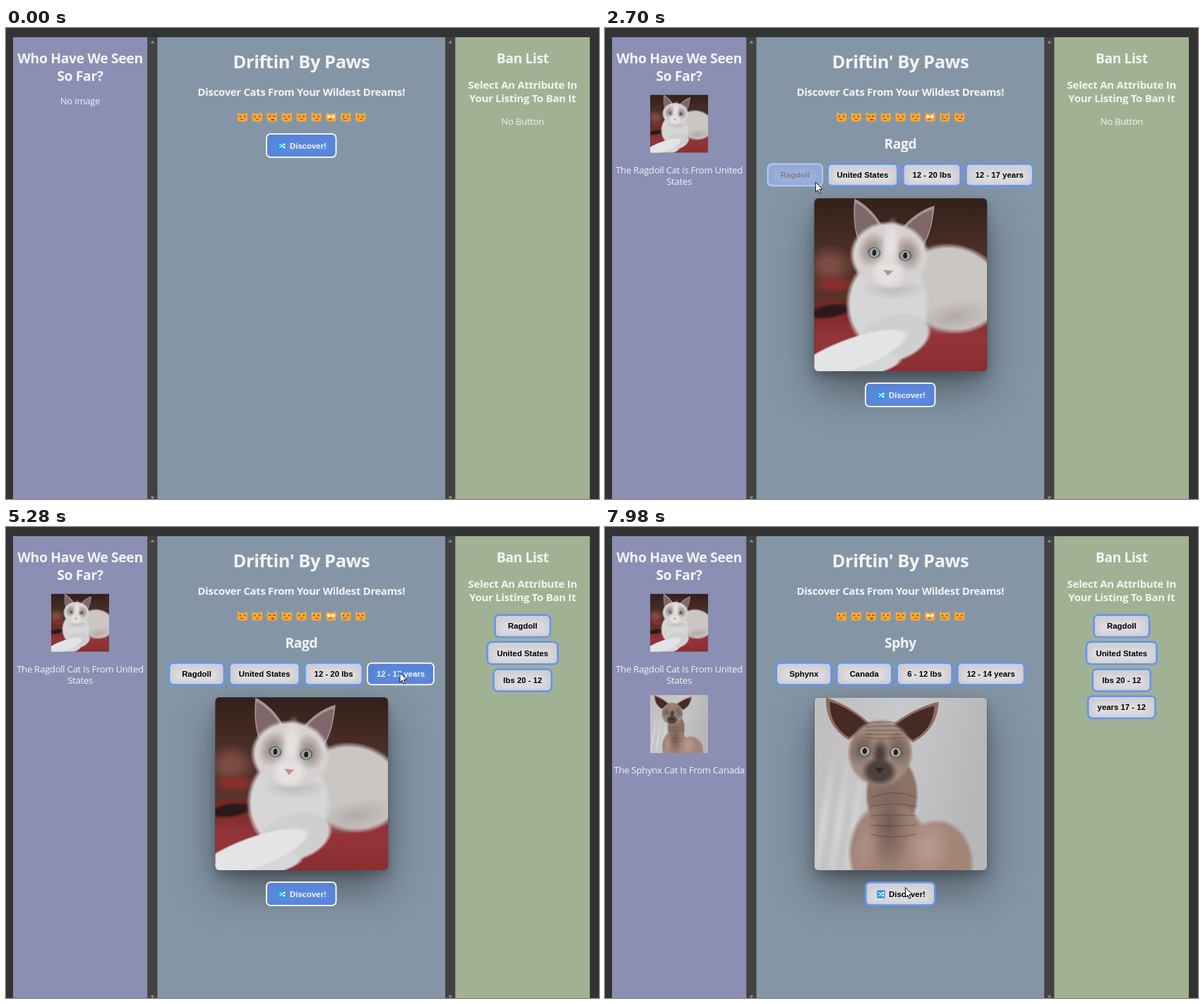
Recreate the animation shown at these times as an HTML page with a canvas. Size 840 by 667 pixels, loop 8 s.

```html
<!DOCTYPE html>
<html lang="en">
<head>
<meta charset="utf-8">
<title>Cat discovery</title>
<style>
html, body { margin: 0; width: 100%; height: 100%; overflow: hidden; background: #333; }
canvas { display: block; width: 840px; height: 667px; }
</style>
</head>
<body>
<canvas id="stage" width="840" height="667"></canvas>
<script>
const ctx = document.getElementById('stage').getContext('2d');
const LOOP = 8000, APPEAR = 260, LOAD1 = 1890, LOAD2 = 7390;
const LEFT = 105, MID = 418.4, RIGHT = 731.8;
const SANS = '"Open Sans", "Noto Sans", sans-serif';
const ARIAL = 'bold 11.4px "Liberation Sans", Arial, sans-serif';

const clamp = v => Math.max(0, Math.min(1, v));
const lerp = (a, b, k) => a + (b - a) * k;
const mix = (a, b, k) => `rgb(${a.map((v, i) => Math.round(lerp(v, b[i], k))).join()})`;

// Pointer moves: start, end, x, y, sideways bow, strength of the slow-down
const moves = [
  [APPEAR, 1020, 440, 172],
  [1100, 1430, 464, 324],
  [2430, 3180, 266, 206, -12, 4.3],
  [3250, 3720, 343, 206],
  [3850, 3920, 355, 204],
  [4110, 4670, 467, 201],
  [4810, 5350, 559, 206],
  [5490, 6250, 425, 515, 49, 2.6],
  [7910, 7980, 425, 510]
];

function pointer(t) {
  let x = 587, y = 621;
  for (const [t0, t1, toX, toY, bow = 0, snap = 2] of moves) {
    if (t < t0) break;
    const dx = toX - x, dy = toY - y;
    const u = 1 - (1 - clamp((t - t0) / (t1 - t0))) ** snap;
    const side = 4 * u * (1 - u) * bow / Math.hypot(dx, dy);
    x += dx * u + dy * side;
    y += dy * u - dx * side;
  }
  return [x, y];
}

// Hover fades by the share of the last moments the pointer spent inside
function hover(t, x, y, w, h) {
  const n = 26;
  let hits = 0;
  for (let i = 0; i < n; i++) {
    const past = t - i * 5, [px, py] = pointer(past);
    if (past >= APPEAR && px > x && px < x + w && py > y && py < y + h) hits++;
  }
  return 1 - (1 - hits / n) ** 2;
}

function text(str, x, y, size, bold) {
  ctx.font = `${bold ? 'bold ' : ''}${size}px ${SANS}`;
  ctx.letterSpacing = (-0.02 * size) + 'px';
  ctx.textAlign = 'center';
  ctx.fillStyle = '#f3f3f3';
  ctx.fillText(str, x, y);
  ctx.letterSpacing = '0px';
}

function rect(x, y, w, h, color) {
  ctx.fillStyle = color;
  ctx.fillRect(x, y, w, h);
}

function box(x, y, w, h, r) {
  ctx.beginPath();
  ctx.roundRect(x, y, w, h, r);
}

function poly(color, ...pts) {
  ctx.fillStyle = color;
  ctx.beginPath();
  for (const [x, y] of pts) ctx.lineTo(x, y);
  ctx.closePath();
  ctx.fill();
}

function shade(x0, y0, x1, y1, ...colors) {
  const g = ctx.createLinearGradient(x0, y0, x1, y1);
  colors.forEach((c, i) => g.addColorStop(i / (colors.length - 1), c));
  return g;
}

// Oval that is solid up to `core` and fades out at its rim
function soft(color, x, y, rx, ry, turn = 0, core = .88) {
  ctx.save();
  ctx.translate(x, y);
  ctx.rotate(turn);
  ctx.scale(rx, ry);
  const g = ctx.createRadialGradient(0, 0, core, 0, 0, 1);
  g.addColorStop(0, color);
  g.addColorStop(1, color + '00');
  ctx.fillStyle = g;
  ctx.beginPath();
  ctx.arc(0, 0, 1, 0, 7);
  ctx.fill();
  ctx.restore();
}

function ear(side, tip, color) {
  ctx.fillStyle = color;
  ctx.beginPath();
  ctx.moveTo(side * 12, -36);
  ctx.quadraticCurveTo(side * tip * .55, -64, side * tip, -74);
  ctx.quadraticCurveTo(side * tip, -35, side * 46, -15);
  ctx.fill();
}

// Head drawn around the point between the eyes
function head(c) {
  ctx.save();
  ctx.translate(c.x, c.y);
  ctx.rotate(c.tilt);
  for (const s of [-1, 1]) {
    ear(s, c.tip, c.ear);
    ctx.save();
    ctx.translate(s * 7, -6);
    ctx.scale(.84, .84);
    ear(s, c.tip, c.inner);
    ctx.restore();
  }
  soft(c.face, 0, 2, c.wide, 49);
  for (const s of [-1, 1]) soft(c.mask, s * 26, -4, 20, 27, s * -.3, .3);
  soft(c.muzzle, 0, 28, 26, 21, 0, .6);
  soft(c.muzzle, 0, 26 - c.blaze, 13, c.blaze, 0, .3);
  for (const s of [-1, 1]) {
    soft('#4f4648', s * 22, 0, 10, 8.5, s * -.2, .7);
    soft(c.iris, s * 22, 0, 7.5, 7);
    soft('#202125', s * 22, 0, 3.2, 4.5);
  }
  poly(c.nose, [-7, 23], [7, 23], [0, 31]);
  ctx.restore();
}

function ragdoll() {
  rect(0, 0, 245, 245, shade(0, 0, 0, 150, '#33201b', '#4b2f27', '#5c332b'));
  soft('#7a4c42', 22, 95, 36, 30, 0, .3);
  soft('#8a2e2b', 28, 122, 32, 13, 0, .4);
  rect(0, 146, 245, 99, shade(0, 146, 0, 245, '#702725', '#94343a', '#8a2e2f'));
  soft('#2b191b', 22, 160, 36, 11, -.15, .6);
  soft('#cac6c4', 195, 128, 76, 64, .25);
  soft('#b5adab', 200, 168, 58, 24, -.2, .1);
  soft('#d6d6d7', 104, 150, 60, 70);
  soft('#d0cfd0', 112, 198, 56, 34, -.3);
  soft('#d6d7d8', 55, 238, 72, 18, -.15);
  soft('#e2e4e5', 52, 221, 88, 23, -.35);
  soft('#bfbcbc', 112, 128, 48, 16, 0, .1);
  head({ x: 107, y: 79, tilt: .09, tip: 57, wide: 57, blaze: 40, ear: '#a3948f', inner: '#80676a',
    face: '#d6d1d0', mask: '#a1938f', muzzle: '#e4e1e0', iris: '#98a6ab', nose: '#bd908e' });
}

function folds(n, x, y, w, step) {
  ctx.strokeStyle = 'rgba(85,62,54,.45)';
  ctx.lineWidth = 1.6;
  for (let i = 0; i < n; i++) {
    ctx.beginPath();
    ctx.moveTo(x - w, y + i * step);
    ctx.quadraticCurveTo(x, y + (i * 1.4 - 1) * step, x + w, y + i * step);
    ctx.stroke();
  }
}

function sphynx() {
  rect(0, 0, 245, 245, shade(0, 0, 245, 60, '#bdbdc0', '#c9c9cb', '#b7b7ba'));
  for (let i = 0; i < 3; i++) soft('#d3d3d5', 12 + i * 22, 185, 9, 110, .15, .1);
  soft('#8a7267', 110, 138, 38, 58);
  soft('#a08376', 106, 220, 59, 74);
  soft('#a48679', 174, 236, 53, 64);
  soft('#775f57', 106, 180, 30, 72, 0, .1);
  soft('#b9998d', 162, 214, 32, 44, .2, .1);
  soft('#ad8f83', 72, 215, 20, 45, .15, .1);
  folds(5, 112, 142, 32, 13);
  head({ x: 93.5, y: 77, tilt: .04, tip: 80, wide: 47, blaze: 23, ear: '#8c6d60', inner: '#472a26',
    face: '#a08a7d', mask: '#79675e', muzzle: '#4c413e', iris: '#a3a89f', nose: '#2c2727' });
  folds(5, 99, 37, 26, 5);
}

function photo(draw, x, y, size, r) {
  ctx.save();
  box(x, y, size, size, r);
  ctx.clip();
  ctx.translate(x, y);
  ctx.scale(size / 245, size / 245);
  draw();
  ctx.restore();
}

function shadow(x, y, s, dy, blur, alpha) {
  ctx.save();
  ctx.shadowColor = `rgba(0,0,0,${alpha})`;
  ctx.shadowBlur = blur;
  ctx.shadowOffsetY = dy;
  box(x, y, s, s, 6);
  ctx.fillStyle = '#444';
  ctx.fill();
  ctx.restore();
}

// k runs from the light look (0) to the blue look (1)
function button(x, y, w, h, k) {
  const b = lerp(2.5, 1.8, k);
  box(x + b / 2, y + b / 2, w - b, h - b, 6);
  ctx.fillStyle = mix([224, 223, 226], [93, 139, 224], k);
  ctx.fill();
  ctx.lineWidth = b;
  ctx.strokeStyle = mix([100, 149, 237], [245, 245, 245], k);
  ctx.save();
  ctx.clip();
  ctx.shadowColor = 'rgba(40,30,70,.5)';
  ctx.shadowBlur = 13;
  ctx.shadowOffsetY = 2;
  ctx.stroke();
  ctx.restore();
  ctx.stroke();
  ctx.font = ARIAL;
  ctx.fillStyle = mix([0, 0, 0], [245, 245, 245], k);
}

function label(str, x, y) {
  ctx.textAlign = 'center';
  ctx.fillText(str, x, y);
}

function tagWidth(str) {
  ctx.font = ARIAL;
  return Math.max(80.5, ctx.measureText(str).width + 29);
}

function tagRow(t, tags) {
  const gap = 5, full = tags.map(tagWidth);
  const sum = list => list.reduce((a, b) => a + b + gap, -gap);
  let x = MID - sum(full) / 2;
  const lit = full.map(w => {
    const k = hover(t, x, 191, w, 34);
    x += w + gap;
    return k;
  });
  const widths = full.map((w, i) => w - 1.5 * lit[i]);
  x = MID - sum(widths) / 2;
  tags.forEach((s, i) => {
    const k = lit[i], w = widths[i];
    button(x, 191 + .8 * k, w, 34 - 1.6 * k, k);
    label(s, x + w / 2, 212);
    x += w + gap;
  });
}

function discover(t, y) {
  button(368, y, 100.5, 35, 1 - hover(t, 368, y, 100.5, 35));
  ctx.textAlign = 'left';
  ctx.fillText('Discover!', 402, y + 22);
  box(385.3, y + 12.3, 11.5, 11.5, 1.5);
  ctx.fillStyle = '#2699e6';
  ctx.fill();
  ctx.strokeStyle = '#fff';
  ctx.lineWidth = 1.1;
  ctx.beginPath();
  for (const s of [-2, 2]) {
    const m = y + 18;
    ctx.moveTo(387, m + s);
    ctx.lineTo(389, m + s);
    ctx.lineTo(392.5, m - s);
    ctx.lineTo(395, m - s);
    ctx.moveTo(393.6, m - s - 1.5);
    ctx.lineTo(395.2, m - s);
    ctx.lineTo(393.6, m - s + 1.5);
  }
  ctx.stroke();
}

function catFace(i) {
  const ink = '#70451f', wide = i === 2, starry = i === 6;
  ctx.save();
  ctx.translate(335 + 20.9 * i, 126);
  box(-7, -4.4, 14, 11, 3);
  ctx.fillStyle = '#f9a632';
  ctx.fill();
  for (const s of [-1, 1]) {
    poly('#f9a632', [7 * s, -6.5], [7 * s, 0], [1.5 * s, -4]);
    if (starry) soft('#fff3dc', 3 * s, -.6, 2.6, 2.4);
    else rect(3.2 * s - (wide ? 2 : 1), -1.6, wide ? 4 : 2, wide ? 1.2 : 1.8, ink);
  }
  rect(i % 3 - 3, 2.8, 4, wide ? 2 : 1, ink);
  if (i === 7) soft('#49a9e4', -3.4, 3, 1.4, 2);
  ctx.restore();
}

function scrollbar(x) {
  rect(x, 13, 14, 654, '#424242');
  const c = x + 7;
  for (const y of [18, 663.5]) {
    const up = y < 99 ? 0 : 3.5;
    poly('#949494', [c - 3, y + 3.5 - up], [c, y + up], [c + 3, y + 3.5 - up]);
  }
}

function arrow(x, y) {
  ctx.save();
  ctx.translate(x + .5, y + .5);
  ctx.lineJoin = 'round';
  poly('#fff', [0, 0], [0, 13.6], [3.2, 10.8], [5.4, 16], [7.6, 15], [5.4, 10], [9.6, 9.8]);
  ctx.strokeStyle = '#111';
  ctx.lineWidth = 1;
  ctx.stroke();
  ctx.restore();
}

function history(loaded, second) {
  text('Who Have We Seen', LEFT, 50, 19.4, true);
  text('So Far?', LEFT, 74.5, 19.4, true);
  if (!loaded) return text('No Image', LEFT, 108, 13.1);
  photo(ragdoll, 64, 94.5, 82, 0);
  text('The Ragdoll Cat Is From United', LEFT, 205.5, 13.1);
  text('States', LEFT, 222, 13.1);
  if (!second) return;
  photo(sphynx, 64, 238, 82, 0);
  text('The Sphynx Cat Is From Canada', LEFT, 349, 13.1);
}

function finder(t, loaded, second) {
  text("Driftin' By Paws", MID, 57, 25.6, true);
  text('Discover Cats From Your Wildest Dreams!', MID, 96.3, 14.9, true);
  for (let i = 0; i < 9; i++) catFace(i);
  if (loaded) {
    const frame = [296.5, 241.3, 244.7];
    shadow(...frame, 26, 60, .4);
    shadow(...frame, 8, 14, .2);
    photo(second ? sphynx : ragdoll, ...frame, 6);
    text(second ? 'Sphy' : 'Ragd', MID, 170.5, 19.2, true);
    tagRow(t, second ? ['Sphynx', 'Canada', '6 - 12 lbs', '12 - 14 years']
      : ['Ragdoll', 'United States', '12 - 20 lbs', '12 - 17 years']);
  }
  discover(t, loaded ? 502 : 149);
}

function banList(t) {
  text('Ban List', RIGHT, 50, 19.2, true);
  text('Select An Attribute In', RIGHT, 85.7, 15, true);
  text('Your Listing To Ban It', RIGHT, 104.5, 15, true);
  const bans = [['Ragdoll', 3110], ['United States', 3920], ['lbs 20 - 12', 4670], ['years 17 - 12', 5350]]
    .filter(b => t >= b[1]);
  if (!bans.length) text('No Button', RIGHT, 136.5, 13.1);
  bans.forEach(([s], i) => {
    const y = 123.3 + 38.3 * i, w = tagWidth(s) + .6;
    button(RIGHT - w / 2, y, w, 34, 0);
    label(s, RIGHT, y + 21);
  });
}

function render(t) {
  const loaded = t >= LOAD1, second = t >= LOAD2;
  rect(0, 0, 840, 667, '#333');
  rect(10, 13, 190.5, 654, '#8a8fb3');
  rect(214, 13, 408.5, 654, '#8496a6');
  rect(636, 13, 191, 654, '#a0b293');
  scrollbar(200.5);
  scrollbar(622.4);
  history(loaded, second);
  finder(t, loaded, second);
  banList(t);
  if (t >= APPEAR) arrow(...pointer(t));
}

const start = performance.now();
function tick() {
  render((performance.now() - start) % LOOP);
  requestAnimationFrame(tick);
}
tick();
</script>
</body>
</html>
```
